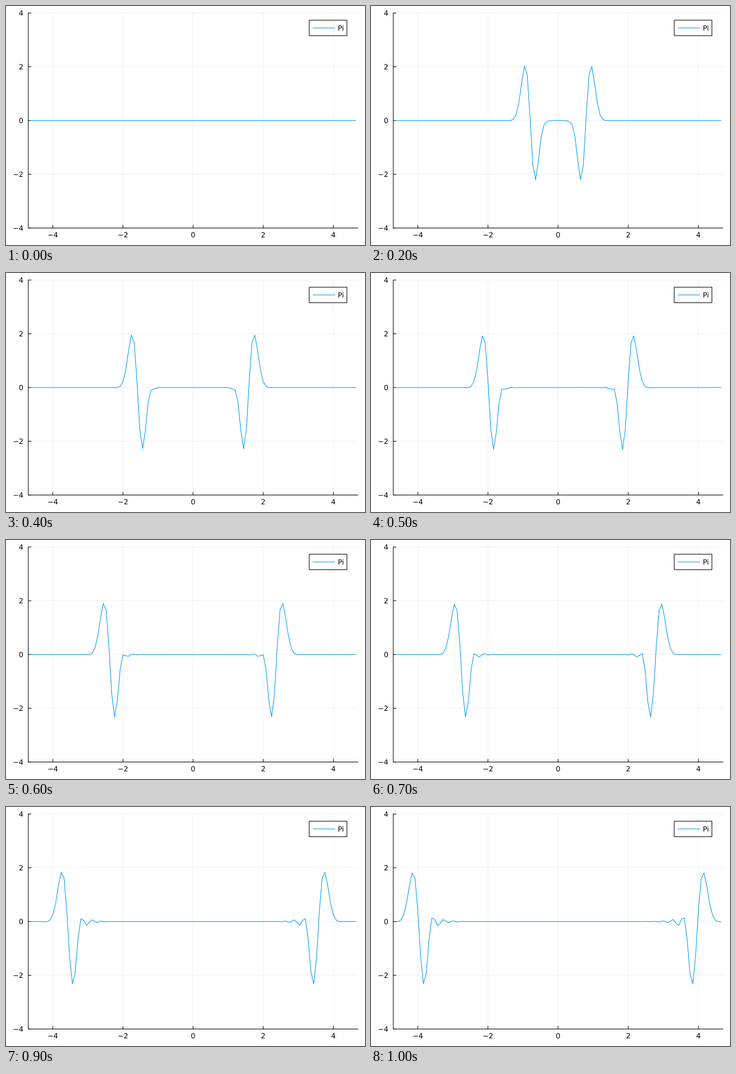
These frames come from a looping animation (600x400 px, 1.05 s). A matplotlib script:

```python
import numpy as np
import matplotlib.pyplot as plt
from matplotlib.animation import FuncAnimation
from matplotlib.patches import Rectangle
from matplotlib.patheffects import Normal

W, H, DPI = 600, 400, 100
PX = 72 / DPI  # points per pixel
LEFT, RIGHT, TOP, BOTTOM = 37.2, 588.19, 11.81, 371.61
XLIM, YLIM = 4.7, 4
TICK = 4.72
BLUE = "#009AF9"
FRAMES, INTERVAL, DT = 21, 50, 0.2

plt.rcParams.update({
    "font.family": "DejaVu Sans",
    "font.size": 11.87 * PX,
    "text.hinting": "none",
    "path.simplify": False,
    "path.snap": False,
    "lines.solid_capstyle": "round",
    "lines.solid_joinstyle": "round",
})

# Wave equation on a periodic grid, fourth-order Laplacian, Gaussian at rest
DX, HALF = 0.08, 59
x = DX * np.arange(-HALF, HALF)
spectrum = np.fft.rfft(np.exp(-25 * x**2))
s2 = np.sin(np.pi * np.arange(HALF + 1) / (2 * HALF)) ** 2
omega = np.sqrt(4 * s2 + 4 / 3 * s2**2) / DX


def momentum(t):
    return np.fft.irfft(-omega * np.sin(omega * t) * spectrum, len(x))[1:]


def px(v):
    return LEFT + (v + XLIM) / (2 * XLIM) * (RIGHT - LEFT)


def py(v):
    return BOTTOM - (v + YLIM) / (2 * YLIM) * (BOTTOM - TOP)


# One axes in pixel units covers the whole figure
fig = plt.figure(figsize=(W / DPI, H / DPI), dpi=DPI, facecolor="white")
ax = fig.add_axes([0, 0, 1, 1])
ax.set(xlim=(0, W), ylim=(H, 0))
ax.axis("off")


def stroke(xs, ys, color="black", width=1, **kw):
    return ax.plot(xs, ys, color=color, linewidth=width * PX, **kw)[0]


def label(x0, y0, text, ha):
    # the path effect draws outlines at exact sub-pixel positions
    ax.text(x0, y0, text, ha=ha, va="baseline", path_effects=[Normal()])


ticks = range(-4, 5, 2)
for v in ticks:
    stroke([px(v)] * 2, [TOP, BOTTOM], width=0.5, alpha=0.125)
    stroke([LEFT, RIGHT], [py(v)] * 2, width=0.5, alpha=0.125)

stroke([LEFT, LEFT, RIGHT], [TOP, BOTTOM, BOTTOM])
for v in ticks:
    name = str(v).replace("-", "\u2212")
    stroke([px(v)] * 2, [BOTTOM, BOTTOM - TICK])
    stroke([LEFT, LEFT + TICK], [py(v)] * 2)
    label(px(v), 387.2, name, "center")
    label(29, py(v) + 4.32, name, "right")

curve = stroke(px(x[1:]), py(momentum(0)), BLUE)

# Legend
ax.add_patch(Rectangle((506.8, 23.8), 63, 25.92, facecolor="white",
                       edgecolor="black", linewidth=PX, zorder=3))
stroke([512.9, 549.6], [36.76] * 2, BLUE, zorder=4)
label(554.6, 41.08, "Pi", "left")
ax.texts[-1].set_zorder(4)


def update(i):
    curve.set_ydata(py(momentum(i * DT)))
    return curve,


anim = FuncAnimation(fig, update, frames=FRAMES, interval=INTERVAL,
                     repeat=True, repeat_delay=0)
plt.show()
```
